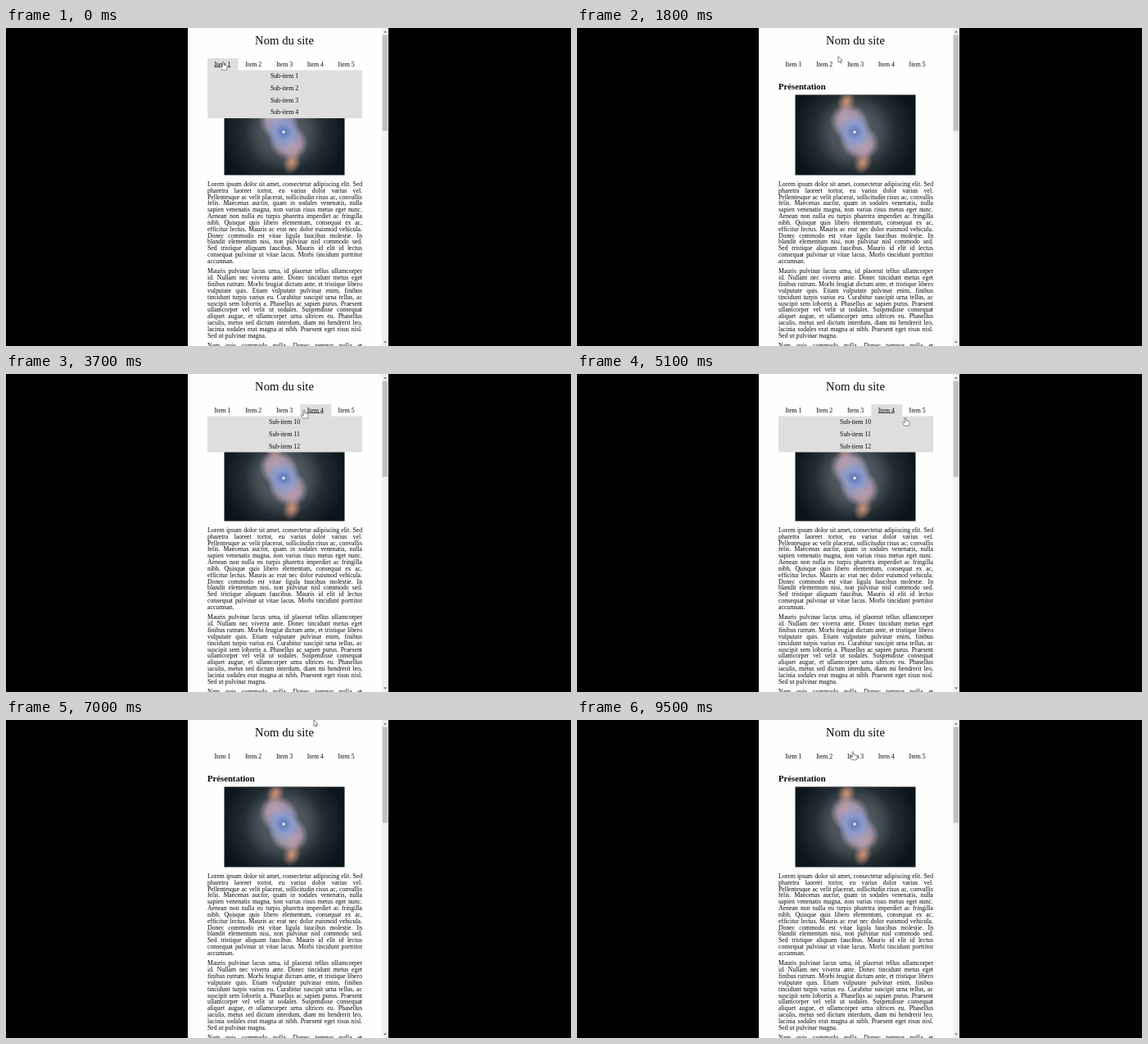
These frames come from a looping animation (690 px wide and 388 px high, 10 s). An HTML page with a canvas:

```html
<!DOCTYPE html>
<html lang="fr">
<head>
<meta charset="utf-8">
<title>Nom du site</title>
<style>
html, body { margin: 0; width: 100%; height: 100%; overflow: hidden; background: #000; }
canvas { display: block; width: 690px; height: 388px; }
</style>
</head>
<body>
<canvas id="stage"></canvas>
<script>
const W = 690, H = 388, LOOP = 10000, STEP = 100;
const LEFT = 246, RIGHT = 435, MID = 340;
const NAV_TOP = 37, NAV_BOTTOM = 51.5, ROW = 14.65, CELL = (RIGHT - LEFT) / 5;
const LEADING = 7.83;
const SERIF = '"Liberation Serif", "Times New Roman", serif';
const INK = '#080808', GREY = '#dedede';

const canvas = document.getElementById('stage');
const ctx = canvas.getContext('2d');
const ratio = window.devicePixelRatio || 1;
canvas.width = W * ratio;
canvas.height = H * ratio;
ctx.scale(ratio, ratio);

const paragraphs = [
  `Lorem ipsum dolor sit amet, consectetur adipiscing elit. Sed
pharetra laoreet tortor, eu varius dolor varius vel.
Pellentesque ac velit placerat, sollicitudin risus ac, convallis
felis. Maecenas auctor, quam in sodales venenatis, nulla
sapien venenatis magna, non varius risus metus eget nunc.
Aenean non nulla eu turpis pharetra imperdiet ac fringilla
nibh. Quisque quis libero elementum, consequat ex ac,
efficitur lectus. Mauris ac erat nec dolor euismod vehicula.
Donec commodo est vitae ligula faucibus molestie. In
blandit elementum nisi, non pulvinar nisl commodo sed.
Sed tristique aliquam faucibus. Mauris id elit id lectus
consequat pulvinar ut vitae lacus. Morbi tincidunt porttitor
accumsan.`,
  `Mauris pulvinar lacus urna, id placerat tellus ullamcorper
id. Nullam nec viverra ante. Donec tincidunt metus eget
finibus rutrum. Morbi feugiat dictum ante, et tristique libero
vulputate quis. Etiam vulputate pulvinar enim, finibus
tincidunt turpis varius eu. Curabitur suscipit urna tellus, ac
suscipit sem lobortis a. Phasellus ac sapien purus. Praesent
ullamcorper vel velit ut sodales. Suspendisse consequat
aliquet augue, et ullamcorper urna ultrices eu. Phasellus
iaculis, metus sed dictum interdum, diam mi hendrerit leo,
lacinia sodales erat magna at nibh. Praesent eget risus nisl.
Sed ut pulvinar magna.`,
  'Nam quis commodo nulla. Donec tempor nulla et\n'
];

// sub-items are numbered on from one menu to the next
let count = 0;
const menus = [4, 3, 2, 3, 2].map(size => Array.from({ length: size }, () => ++count));

// where the pointer turns or rests: time, x, y
const stops = [
  [0, 265, 41], [400, 265, 41], [700, 275, 56], [1400, 340, 62], [1800, 319, 34.5],
  [2500, 302, 41], [2900, 302, 41], [3700, 364, 44], [4400, 378, 43], [5100, 401, 53],
  [5500, 412, 43], [6000, 372, 43], [6600, 378, 41], [7000, 376, 0], [7200, 376, -14],
  [8700, 372, -12], [9300, 337, 38.5], [LOOP, 337, 38.5]
];

function pointerAt(t) {
  const i = stops.findIndex(s => s[0] > t);
  const [t0, x0, y0] = stops[i - 1], [t1, x1, y1] = stops[i];
  const u = (t - t0) / (t1 - t0), k = u * u * (3 - 2 * u);
  return [x0 + (x1 - x0) * k, y0 + (y1 - y0) * k];
}

// a menu opens under its tab and stays while the pointer is on its rows
function hover(open, x, y) {
  if (y < NAV_TOP + 3) return 0;
  if (y < NAV_BOTTOM) return 1 + Math.floor((x - LEFT) / CELL);
  return open && y < NAV_BOTTOM + menus[open - 1].length * ROW ? open : 0;
}

const states = [];
for (let t = 0, open = 0; t < LOOP; t += STEP) {
  const [x, y] = pointerAt(t);
  open = hover(open, x, y);
  states.push({ x, y, open });
}

function box(x, y, w, h, color) {
  ctx.fillStyle = color;
  ctx.fillRect(x, y, w, h);
}

function label(text, x, y, size, align = 'center', weight = '') {
  ctx.font = `${weight} ${size}px ${SERIF}`;
  ctx.textAlign = align;
  ctx.fillStyle = INK;
  ctx.fillText(text, x, y);
}

function justify(line, y) {
  const words = line.split(' ');
  const widths = words.map(w => ctx.measureText(w).width);
  const gap = (RIGHT - LEFT - widths.reduce((a, b) => a + b, 0)) / (words.length - 1);
  let x = LEFT;
  words.forEach((word, i) => {
    ctx.fillText(word, x, y);
    x += widths[i] + gap;
  });
}

function drawParagraphs() {
  let y = 193;
  ctx.font = `7.75px ${SERIF}`;
  ctx.textAlign = 'left';
  ctx.fillStyle = INK;
  for (const text of paragraphs) {
    const lines = text.split('\n'), last = lines.pop();
    for (const line of lines) {
      justify(line, y);
      y += LEADING;
    }
    ctx.fillText(last, LEFT, y);
    y += LEADING * 1.6;
  }
}

// soft ellipse: rgb is "r,g,b", core is the share kept at full strength
function glow(x, y, rx, ry, turn, rgb, alpha, core = 0) {
  const g = ctx.createRadialGradient(0, 0, core, 0, 0, 1);
  g.addColorStop(0, `rgba(${rgb},${alpha})`);
  g.addColorStop(1, `rgba(${rgb},0)`);
  ctx.save();
  ctx.translate(x, y);
  ctx.rotate(turn);
  ctx.scale(rx, ry);
  ctx.fillStyle = g;
  ctx.beginPath();
  ctx.arc(0, 0, 1, 0, 7);
  ctx.fill();
  ctx.restore();
}

function drawPicture() {
  const x = 339, y = 127;
  ctx.save();
  ctx.beginPath();
  ctx.rect(266.5, 81.5, 147, 98);
  ctx.clip();
  box(266, 81, 148, 99, '#0b161c');
  glow(x, y, 76, 70, 0, '84,94,98', 0.65, 0.3);
  glow(x, y, 48, 48, 0, '104,110,118', 0.4, 0.6);
  for (const s of [-1, 1]) {
    glow(x + s * 10, y + s * 37, 15, 11, 1.9, '216,152,124', 0.85, 0.15);
    glow(x + s * 6, y + s * 12, 25, 22, 0.5, '196,170,194', 0.7, 0.6);
    glow(x + s * 9, y + s * 16, 15, 13, 0.5, '222,170,170', 0.5, 0.2);
  }
  glow(x, y, 22, 25, -0.4, '128,156,216', 0.85, 0.35);
  glow(x, y, 11, 10, 0, '62,88,152', 0.6);
  glow(x, y, 2.5, 2.5, 0, '255,240,240', 1, 0.3);
  ctx.restore();
}

function triangle(x, y, dir) {
  ctx.fillStyle = '#555';
  ctx.beginPath();
  ctx.moveTo(x - 1.8, y + dir);
  ctx.lineTo(x + 1.8, y + dir);
  ctx.lineTo(x, y - dir);
  ctx.fill();
}

function drawPage() {
  box(0, 0, W, H, '#000');
  box(222, 0, 245, H, '#fefefe');
  box(459, 0, 8, H, '#f1f1f1');
  box(459.7, 8.5, 6.5, 117, '#c0c0c0');
  triangle(463, 4.5, 1);
  triangle(463, 383.5, -1);
  label('Nom du site', MID, 19.7, 14.7);
  label('Présentation', LEFT, 74.6, 10.7, 'left', 'bold');
  drawPicture();
  drawParagraphs();
}

function drawNav(open) {
  for (let i = 0; i < menus.length; i++) {
    const x = LEFT + i * CELL, mid = x + CELL / 2 - 0.5;
    const active = i + 1 === open;
    if (active) box(x, NAV_TOP, CELL, NAV_BOTTOM - NAV_TOP, GREY);
    label('Item ' + (i + 1), mid, 46.6, 7.75);
    if (active) box(mid - 10, 47.3, 20, 0.6, INK);
  }
  if (!open) return;
  const rows = menus[open - 1];
  box(LEFT, NAV_BOTTOM, RIGHT - LEFT, rows.length * ROW, GREY);
  rows.forEach((n, i) => label('Sub-item ' + n, MID, NAV_BOTTOM + i * ROW + 9.9, 7.75));
}

const arrow = new Path2D('M0 0V7.4L1.7 5.9 2.8 8.4 3.9 7.9 2.8 5.5 5.1 5.3Z');
const hand = new Path2D('M-.9 .8Q0 -.7 .9 .8V3.9L4.5 4.8Q5.3 5.2 5.2 6.4L4.4 10.2H-1.2' +
  'L-3.5 6.5Q-3.5 5.2 -2.3 5.6L-.9 6.9Z');

function drawPointer({ x, y }) {
  const shape = y > NAV_TOP ? hand : arrow;
  ctx.save();
  ctx.translate(x, y);
  ctx.fillStyle = '#fff';
  ctx.strokeStyle = '#555';
  ctx.lineWidth = 0.7;
  ctx.lineJoin = 'round';
  ctx.fill(shape);
  ctx.stroke(shape);
  ctx.restore();
}

function frame() {
  const state = states[Math.floor(performance.now() % LOOP / STEP)];
  drawPage();
  drawNav(state.open);
  drawPointer(state);
  requestAnimationFrame(frame);
}
frame();
</script>
</body>
</html>
```
